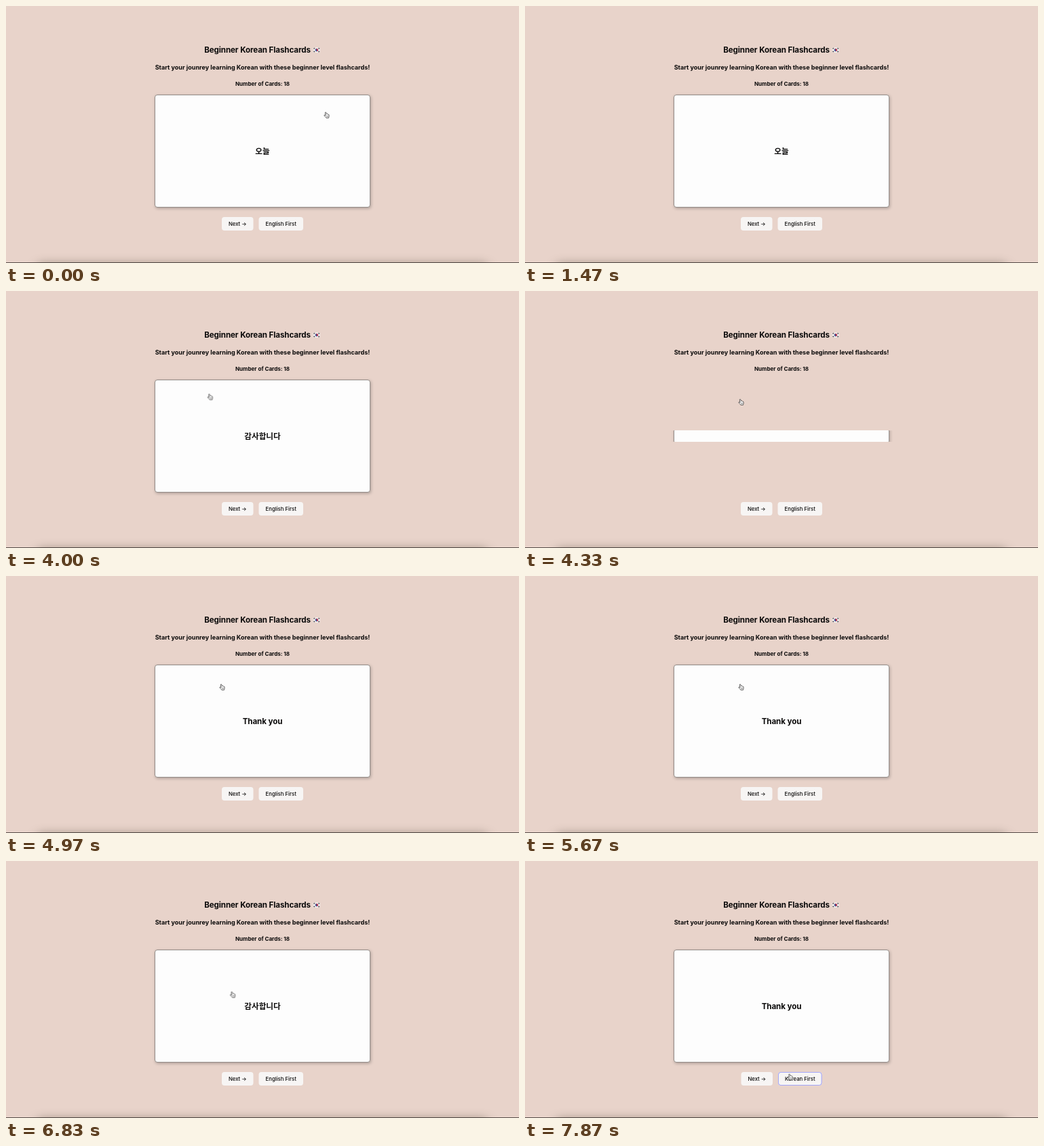
Recreate the animation shown at these times as an HTML page. Size 756 px wide and 380 px high, loop 8000 ms.

```html
<!DOCTYPE html>
<html lang="en">
<head>
<meta charset="utf-8">
<title>Flashcards</title>
<style>
  html, body { margin: 0; width: 100%; height: 100%; overflow: hidden; background: #e8d3ca; }
  .stage { position: relative; width: 756px; height: 380px; overflow: hidden; background: #e8d3ca; }
  .stage > svg { position: absolute; inset: 0; }

  .card {
    position: absolute; left: 219px; top: 131px; width: 318px; height: 167px;
    box-sizing: border-box; border: 1px solid #938c88; border-radius: 4px;
    background: #fdfdfd; box-shadow: 1px 1.5px 4px rgba(0, 0, 0, .26);
    animation: flip 8s step-end infinite;
  }
  .dock {
    position: absolute; left: 46px; top: 382px; width: 664px; height: 20px;
    border-radius: 8px; box-shadow: 0 0 14px 1px rgba(75, 65, 50, .5);
  }
  .edge { position: absolute; left: 0; top: 379px; width: 100%; height: 1px; background: rgba(50, 44, 42, .8); }

  text { font-family: Inter, "Open Sans", sans-serif; font-weight: 700; fill: #0b0a0a; }
  .mid { text-anchor: middle; }
  .big { font-size: 11.6px; letter-spacing: -.1px; }
  .sub { font-size: 9.06px; }
  .count { font-size: 8.05px; }
  .ko { font-family: "Noto Sans CJK KR", "Noto Sans CJK", sans-serif; font-size: 11.6px; }
  .btn text { font-size: 7.75px; font-weight: 500; }
  .btn rect { fill: #f7f5f4; }
  .btn .ring { fill: none; stroke: #646cff; stroke-width: .7; opacity: 0; animation: hover 8s linear infinite; }

  .today { animation: today 8s step-end infinite; }
  .thanks { animation: thanks 8s step-end infinite; }
  .english { animation: english 8s step-end infinite; }
  .before { animation: before 8s step-end infinite; }
  .after { animation: after 8s step-end infinite; }
  .cursor { animation: move 8s ease-in-out infinite; }
  .arrow { animation: arrow 8s step-end infinite; }
  .hand { animation: hand 8s step-end infinite; }

  @keyframes flip {
    0%, 54.98%, 72.1%, 100% { transform: none; }
    54.1%, 71.2% { transform: scaleY(.1); }
    54.6%, 71.6% { transform: scaleY(-.975); }
  }
  @keyframes today { 0% { opacity: 1; } 24.1%, 100% { opacity: 0; } }
  @keyframes thanks {
    0%, 54.1%, 96.6%, 100% { opacity: 0; }
    24.1%, 72.1% { opacity: 1; }
  }
  @keyframes english {
    0%, 71.2% { opacity: 0; }
    54.98%, 96.6%, 100% { opacity: 1; }
  }
  @keyframes before { 0% { opacity: 1; } 96.6%, 100% { opacity: 0; } }
  @keyframes after { 0% { opacity: 0; } 96.6%, 100% { opacity: 1; } }
  @keyframes hover { 0%, 91% { opacity: 0; } 94%, 100% { opacity: .9; } }
  @keyframes move {
    0%, 2.1% { transform: translate(471px, 157px); }
    11.9% { transform: translate(30px, -12px); }
    29.2% { transform: translate(45px, -10px); }
    37.8%, 42% { transform: translate(23.5px, 92.5px); }
    44.2%, 46.5% { transform: translate(236.5px, 125px); }
    51.7%, 82.4% { transform: translate(317px, 160px); }
    91.7%, 100% { transform: translate(389.5px, 315px); }
  }
  @keyframes arrow {
    0%, 48.1%, 91%, 100% { opacity: 0; }
    4.8%, 89.5% { opacity: 1; }
  }
  @keyframes hand {
    0%, 48.1%, 91%, 100% { opacity: 1; }
    4.8%, 89.5% { opacity: 0; }
  }
</style>
</head>
<body>
<div class="stage">
  <div class="dock"></div>
  <div class="edge"></div>
  <div class="card"></div>

  <svg width="756" height="380" viewBox="0 0 756 380">
    <text class="big" x="292.2" y="69.2">Beginner Korean Flashcards</text>

    <!-- Flag -->
    <g transform="translate(457.8 65.1)">
      <rect x="-5.2" y="-3.7" width="10.4" height="7.4" rx=".8" fill="#f3eeec"/>
      <circle r="2.1" fill="#2f4f9b"/>
      <path d="M-2.1 0A2.1 2.1 0 0 1 2.1 0A1.05 1.05 0 0 1 0 0A1.05 1.05 0 0 0 -2.1 0Z" fill="#cb3544" transform="rotate(30)"/>
      <g stroke="#38343a" stroke-width="1.8" stroke-dasharray=".5 .15">
        <path d="M-4.3 -1.8L-2.7 -2.8M2.7 -2.8L4.3 -1.8M-4.3 1.8L-2.7 2.8M2.7 2.8L4.3 1.8"/>
      </g>
    </g>

    <text class="sub mid" x="378" y="94.2">Start your jounrey learning Korean with these beginner level flashcards!</text>
    <text class="count mid" x="378" y="117.6">Number of Cards: 18</text>

    <g lang="ko">
      <text class="ko mid today" x="378" y="219.1">오늘</text>
      <text class="ko mid thanks" x="378" y="219.1">감사합니다</text>
    </g>
    <text class="big mid english" x="378" y="219.1">Thank you</text>

    <g class="btn before">
      <rect x="318" y="312" width="46.5" height="20" rx="4"/>
      <text class="mid" x="341.3" y="324.9">Next →</text>
      <rect x="372.5" y="312" width="65.5" height="20" rx="4"/>
      <rect class="ring" x="372.9" y="312.4" width="64.7" height="19.2" rx="3.7"/>
      <text class="mid" x="405.2" y="324.9">English First</text>
    </g>
    <g class="btn after">
      <rect x="318.5" y="312" width="46.5" height="20" rx="4"/>
      <text class="mid" x="341.8" y="324.9">Next →</text>
      <rect x="373" y="312" width="64.5" height="20" rx="4"/>
      <rect class="ring" x="373.4" y="312.4" width="63.7" height="19.2" rx="3.7"/>
      <text class="mid" x="405.3" y="324.9">Korean First</text>
    </g>

    <g class="cursor">
      <path class="arrow" d="M0 0V6.6L1.5 5.2L2.6 7.7L3.7 7.2L2.6 4.8H4.7Z" fill="#000" stroke="#fff" stroke-width=".5" paint-order="stroke"/>
      <g class="hand" stroke="#1c1a1a" stroke-width=".7" stroke-linejoin="round">
        <path fill="#fff" d="M-.7 .9C-.9 0 .6 -.3 .9 .7L1.5 2.7C2 2.3 2.7 2.4 2.9 3C3.4 2.7 4 2.9 4.1 3.5C4.6 3.3 5 3.7 5 4.2V6.3C5 7 4.6 7.6 4.5 8.5H.9C.6 7.6 -1 6.3 -2 5.2C-2.6 4.4 -1.6 3.9 -.9 4.4L.1 5Z"/>
        <path fill="none" stroke-width=".4" d="M1.5 5.2V7M2.6 5.2V7M3.7 5.2V7"/>
      </g>
    </g>
  </svg>
</div>
</body>
</html>
```
